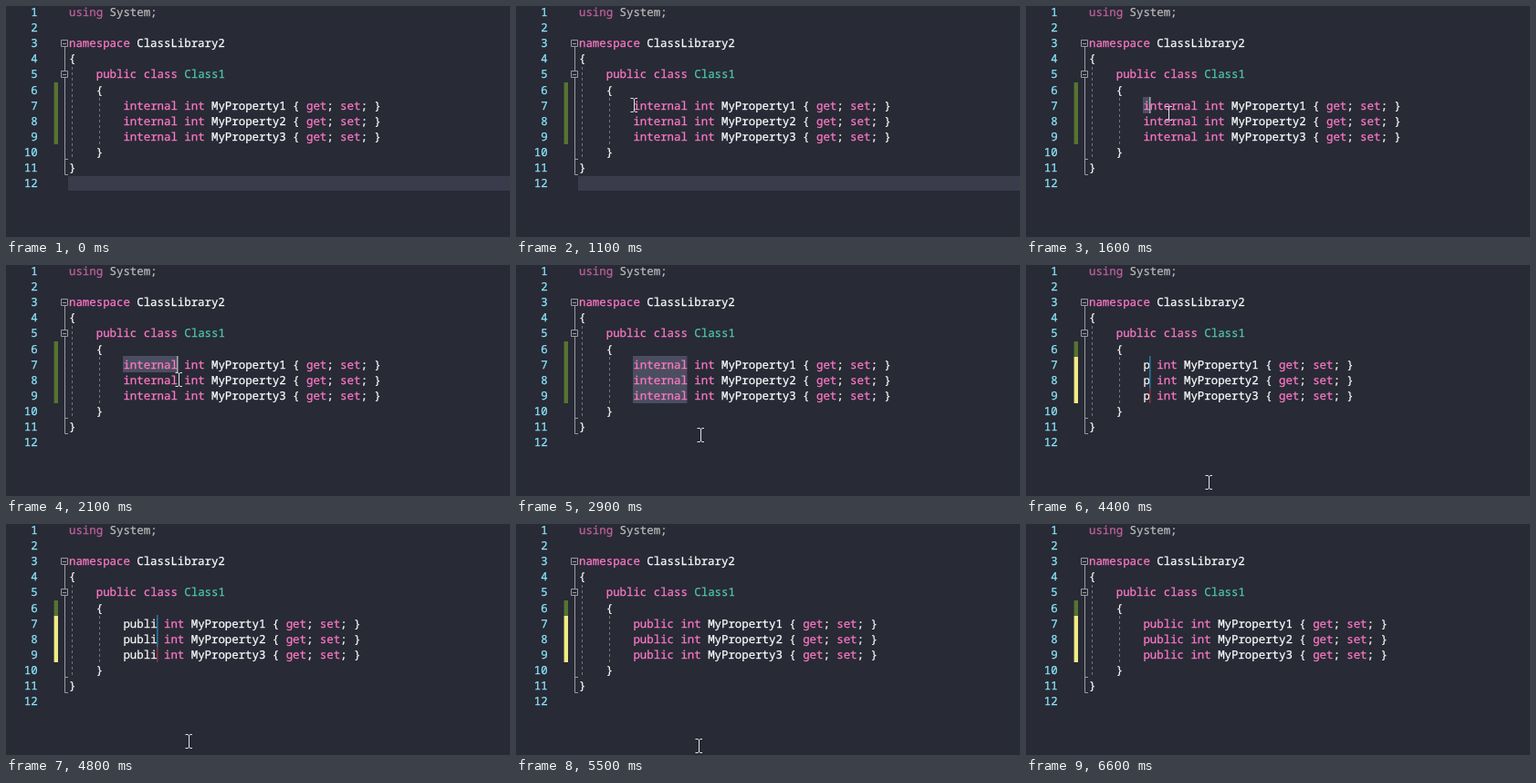
These frames come from a looping animation (552 by 254 pixels, 7100 ms). An HTML page:

```html
<!DOCTYPE html>
<html lang="en">
<head>
<meta charset="utf-8">
<title>Box selection editing</title>
<style>
  html, body { margin: 0; width: 100%; height: 100%; overflow: hidden; background: #282a36; }
  svg { display: block; width: 552px; height: 254px; }
  text {
    font: 500 12.38px "Noto Sans Mono", "DejaVu Sans Mono", monospace;
    font-variant-ligatures: none;
    text-rendering: geometricPrecision;
    white-space: pre;
    fill: #f8f8f2;
    stroke: #f8f8f2;
    stroke-width: .25px;
  }
  .num { fill: #8be9fd; stroke: #8be9fd; }
  .key { fill: #ff79c6; stroke: #ff79c6; }
  .type { fill: #4ec9a8; stroke: #4ec9a8; }
  .name { fill: #fff; stroke: #fff; }
  .dim { opacity: .7; }
  .fold { fill: none; stroke: #9a9ba0; }
  .guide { fill: none; stroke: #74757b; stroke-dasharray: 3 3; }
  .beam { fill: none; stroke: #e4e4e4; }
</style>
</head>
<body>
<svg viewBox="0 0 552 254">
  <rect id="line" x="68" y="187" width="484" height="16" fill="#3a3c4b"/>
  <g id="selection" fill="#4b4e60"></g>
  <g fill="#577430">
    <rect x="52.6" y="84" width="4.4" height="17"/>
    <rect id="bar" x="52.6" y="101" width="4.4" height="51"/>
  </g>
  <path class="guide" d="M72.5 67V168M102.5 101V152"/>
  <path class="fold" d="M60.5 37.5h7v7h-7zM62 41.5h4M60.5 71.5h7v7h-7zM62 75.5h4
    M64.5 45V71M64.5 79V185.5H68M64.5 168.5H68"/>
  <g id="code"></g>
  <g id="carets"></g>
  <path id="mouse" class="beam" d="M-3.5 -7.5H-1L0.5 -6.5L2 -7.5H4M0.5 -6.5V6.5M-3.5 7.5H-1L0.5 6.5L2 7.5H4"/>
</svg>
<script>
const LOOP = 7100, STEP = 100, CHAR = 7.43, LEFT = 69, PITCH = 17.1;
const SELECT = 1600, TYPE = 4400, BLINK = 530;
const $ = id => document.getElementById(id);
const clamp = (v, lo, hi) => Math.min(hi, Math.max(lo, v));
const col = n => LEFT + n * CHAR;
const rowTop = n => Math.round(100.4 + (n - 7) * PITCH);
const baseline = n => 11 + (n - 1) * PITCH;

const KEYWORDS = /^(using|namespace|public|class|internal|int|get|set)$/;
const paint = s => s.replace(/\w+/g, w => {
  const kind = KEYWORDS.test(w) ? 'key'
    : w === 'Class1' ? 'type'
    : /^(ClassLibrary|MyProperty)/.test(w) ? 'name' : '';
  return kind ? `<tspan class="${kind}">${w}</tspan>` : w;
});

function addText(x, row, html, cls = '') {
  const el = document.createElementNS('http://www.w3.org/2000/svg', 'text');
  el.setAttribute('x', x);
  el.setAttribute('y', baseline(row));
  el.setAttribute('class', cls);
  el.innerHTML = html;
  $('code').append(el);
  return el;
}

const source = `using System;

namespace ClassLibrary2
{
    public class Class1
    {



    }
}
`.split('\n');
const rows = source.map((s, i) => {
  const label = String(i + 1);
  addText(34.7 - label.length * CHAR, i + 1, label, 'num');
  const indent = i > 5 && i < 9 ? 8 : s.search(/\S|$/);
  return addText(col(indent), i + 1, paint(s.trim()), i ? '' : 'dim');
});

// Pointer key points: time, x, y
const path = [[100, 525, 249], [800, 144, 116], [1100, 129, 109], [1500, 129, 109], [1600, 156, 118],
  [2100, 189, 126], [2400, 189, 138], [2700, 189, 139], [2900, 202, 187], [3100, 200, 239],
  [5400, 200, 239], [5500, 200, 244]];

function pointer(t) {
  const i = path.findIndex(p => p[0] > t);
  if (i < 1) return path[i < 0 ? path.length - 1 : 0].slice(1);
  const [t0, x0, y0] = path[i - 1], [t1, x1, y1] = path[i];
  const k = (t - t0) / (t1 - t0);
  return [Math.round(x0 + (x1 - x0) * k), Math.round(y0 + (y1 - y0) * k)];
}

// Fast first letters, then two per pause
function wordAt(t) {
  if (t < TYPE) return 'internal';
  const pause = t > TYPE + 200 ? 200 : STEP;
  const key = Math.floor(t / pause) * pause;
  return 'public'.slice(0, 1 + (key - TYPE) / STEP);
}

function caretOn(t) {
  const base = t < TYPE ? 2330 : 4960;
  return t < base || Math.floor((t - base) / BLINK) % 2 === 0;
}

const block = (x, row, w, fill = '') =>
  `<rect x="${x}" y="${rowTop(row)}" width="${w}" height="${rowTop(row + 1) - rowTop(row)}" ${fill}/>`;

function draw(t) {
  const word = wordAt(t), edited = t >= TYPE;

  $('line').style.display = t < 1500 ? '' : 'none';
  $('bar').setAttribute('fill', edited ? '#f0ec82' : '#577430');
  for (let i = 1; i <= 3; i++)
    rows[5 + i].innerHTML = paint(`${word} int MyProperty${i} { get; set; }`);

  // The selection trails the pointer by one step
  const cols = edited ? word.length : clamp(Math.ceil((pointer(t - STEP)[0] - col(8)) / CHAR), 0, 8);
  const count = t < SELECT ? 0 : 1 + clamp((t - 2200) / STEP, 0, 2);
  const caretX = Math.round(col(8 + cols)) - 1;
  let boxes = '', carets = '';
  for (let i = 0; i < count; i++) {
    const color = !edited ? '#a9abb4' : i === 2 ? '#8c3440' : '#2c78a4';
    if (!edited) boxes += block(128, 7 + i, cols * CHAR);
    if (caretOn(t)) carets += block(caretX, 7 + i, 1.5, `fill="${color}"`);
  }
  $('selection').innerHTML = boxes;
  $('carets').innerHTML = carets;

  $('mouse').style.display = t >= 100 && t < 5600 ? '' : 'none';
  $('mouse').setAttribute('transform', `translate(${pointer(t)})`);
}

let start, last;
function tick(now) {
  start ??= now;
  const t = Math.floor(Math.max(0, now - start) % LOOP / STEP) * STEP;
  if (t !== last) draw(last = t);
  requestAnimationFrame(tick);
}
draw(0);
requestAnimationFrame(tick);
</script>
</body>
</html>
```
